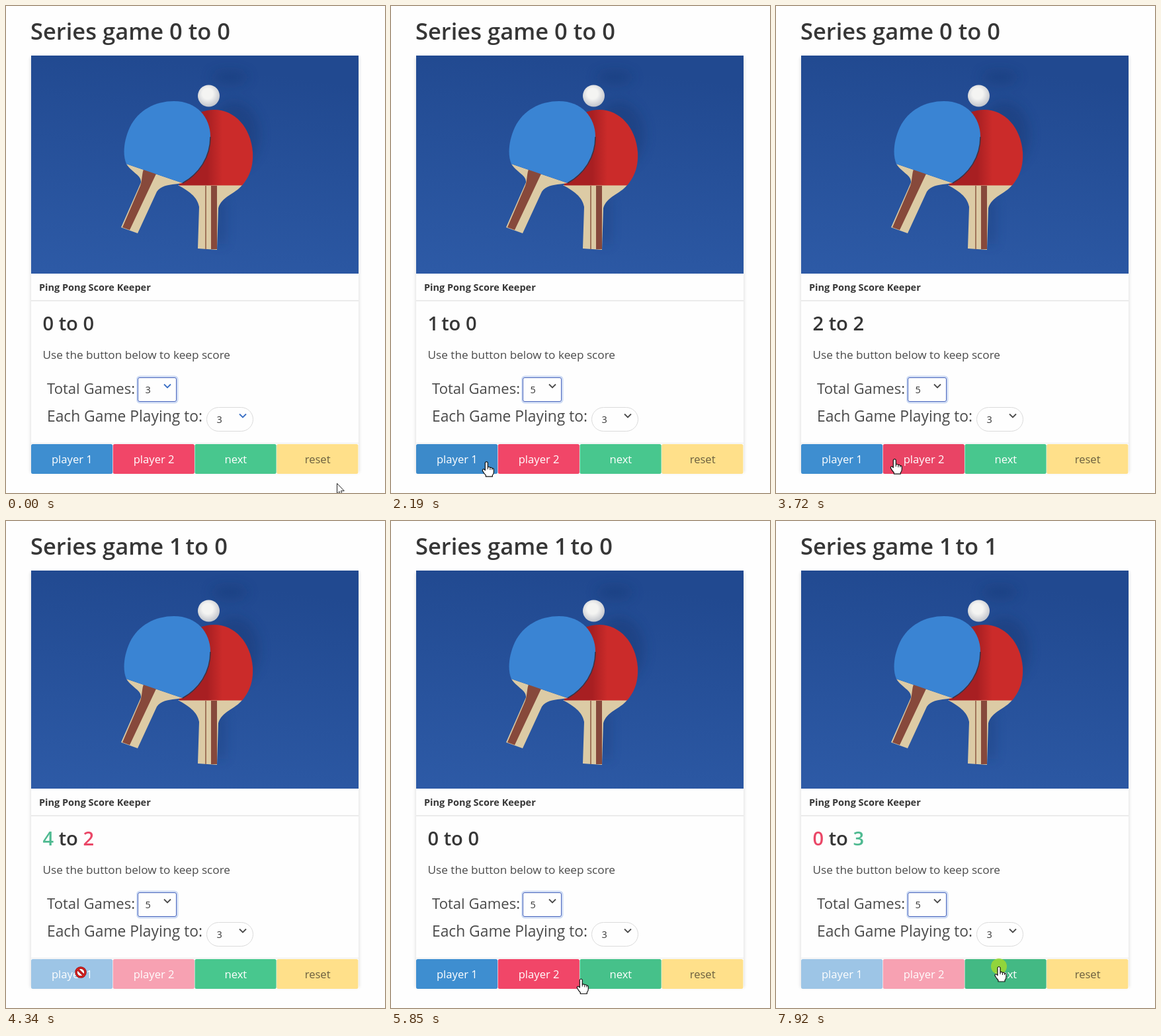
These frames come from a looping animation (573 by 737 pixels, 8 s). An HTML page:

```html
<!DOCTYPE html>
<html lang="en">
<head>
<meta charset="utf-8">
<title>Ping Pong Score Keeper</title>
<style>
html, body { margin: 0; height: 100%; overflow: hidden; background: #fefefe; }
svg { display: block; font-family: "Open Sans", "Noto Sans", sans-serif; }
.strong { font-weight: 600; fill: #363636; }
.plain { fill: #4a4a4a; }
.value { fill: #363636; font-size: 14.5px; }
</style>
</head>
<body>
<svg width="573" height="737" viewBox="0 0 573 737">
  <defs>
    <linearGradient id="table" x1=".3" y1="0" x2=".1" y2="1">
      <stop offset="0" stop-color="#214990"/><stop offset="1" stop-color="#2d5aa6"/>
    </linearGradient>
    <linearGradient id="red">
      <stop offset=".4" stop-color="#a81f22"/><stop offset=".6" stop-color="#cb2b2a"/>
    </linearGradient>
    <radialGradient id="ball" cx=".45" cy=".4" r=".6">
      <stop offset=".4" stop-color="#f4f4f2"/><stop offset="1" stop-color="#c2c5cc"/>
    </radialGradient>
    <filter id="soft" x="-50%" y="-50%" width="200%" height="200%"><feGaussianBlur stdDeviation="9"/></filter>
    <filter id="fine"><feGaussianBlur stdDeviation="2.5"/></filter>
    <clipPath id="photo"><path d="M38 75H533V405H38Z"/></clipPath>
  </defs>
  <rect width="573" height="737" fill="#fefefe"/>
  <text id="series" class="strong" x="37" y="51" font-size="34.5"/>

  <rect x="37" y="78" width="497" height="628" fill="#0a0a0a" opacity=".12" filter="url(#fine)"/>
  <path d="M38 75H533V708H38Z" fill="#fefefe"/>
  <g clip-path="url(#photo)">
    <path d="M38 75H533V405H38Z" fill="url(#table)"/>
    <g fill="#14346e" filter="url(#soft)" opacity=".4">
      <ellipse cx="338" cy="108" rx="28" ry="10"/>
      <ellipse cx="345" cy="195" rx="38" ry="50"/>
      <path d="M316 290H330V360H316Z"/>
    </g>
    <path d="M260 271H357C346 285 326 288 321 306L319 369L290 367L292 304C289 288 276 280 260 271Z" fill="#dccba5"/>
    <path d="M310 272H319V368H310Z" fill="#87493b"/>
    <path d="M302 272V368" stroke="#a0755a" stroke-width="2"/>
    <path d="M262 271.500H357C370 256 374 240 373 221C370 184 346 157 315 157C285 157 262 180 258 200Z" fill="url(#red)"/>
    <path d="M182 239L267 268C249 271 236 270 228 281L199 344L174 335L204 267C205 256 190 252 182 239Z" fill="#dccba5"/>
    <path d="M208 247L227 254L187 339L176 335L203 272C206 264 205 256 208 247Z" fill="#87493b"/>
    <path d="M182 239C176 225 178 204 187 184C200 157 226 144 254 144C288 144 309 168 309 198C309 229 292 254 267 268Z" fill="#3a84d3"/>
    <path d="M267 268C292 254 309 229 309 198" fill="none" stroke="#3b3346" stroke-width="1.5"/>
    <circle cx="306.500" cy="136" r="16.500" fill="url(#ball)"/>
  </g>

  <path d="M38 446H533" stroke="#e4e4e4" stroke-width="1.500"/>
  <text class="strong" x="50" y="431" font-size="14.500" style="font-weight:700">Ping Pong Score Keeper</text>
  <text id="score" class="strong" x="55.500" y="491" font-size="29.100"/>
  <g class="plain">
    <text x="55.500" y="534" font-size="17.200">Use the button below to keep score</text>
    <text x="62" y="587" font-size="22.100">Total Games:</text>
    <text x="62" y="629" font-size="22.800">Each Game Playing to:</text>
  </g>
  <rect x="198.500" y="561" width="60.500" height="39" rx="4" fill="none" stroke="#cfdcf4" stroke-width="3"/>
  <rect x="199.500" y="562.500" width="58" height="36" rx="2.500" fill="#fefefe" stroke="#4a66bd"/>
  <rect x="303.500" y="607.500" width="70" height="36" rx="18" fill="#fefefe" stroke="#dbdbdb"/>
  <text id="games" class="value" x="210.500" y="586"/>
  <text class="value" x="318.500" y="631">3</text>
  <path id="chevrons" d="M239 572.500l5 5l5-5M353 617.500l5 5l5-5" fill="none" stroke-width="1.800"/>
  <path d="M38 661.500H533" stroke="#ededed"/>
  <g id="buttons" font-size="16.600" text-anchor="middle"/>
  <g id="list"/>
  <g id="pointer">
    <circle id="tap" r="12" fill="#a8dc28" fill-opacity=".78"/>
    <g id="cursor" stroke-linejoin="round"/>
  </g>
</svg>
<script>
const $ = id => document.getElementById(id);
const LOOP = 8000, TRAVEL = 700, LEFT = 38, WIDTH = 123.75, TARGET = 3;

const buttons = [
  { label: "player 1", fill: "#3e8ed0", ink: "#fff" },
  { label: "player 2", fill: "#f14668", ink: "#fff" },
  { label: "next", fill: "#48c78e", ink: "#fff" },
  { label: "reset", fill: "#ffe08a", ink: "#6a5f3f" },
];

const spots = {
  rest: [500, 722], select: [205, 567], option: [234, 633],
  one: [107, 690], oneAgain: [113, 683], two: [238, 687],
  next: [337, 698], nextAgain: [337, 674],
};

// Each tap: where, pressed at, released at. Everything else follows from these.
const taps = [
  ["rest", 0, 0], ["select", 690, 820], ["option", 960, 1230],
  ["one", 1920, 2050], ["two", 2450, 2520], ["one", 3030, 3160], ["two", 3440, 3510],
  ["oneAgain", 3950, 4070], ["oneAgain", 4270, 4340], ["next", 5360, 5430],
  ["two", 6200, 6270], ["two", 6950, 7020], ["two", 7220, 7290], ["nextAgain", 7900, LOOP],
].map(([spot, press, release]) => ({ at: spots[spot], press, release }));

const cursors = {
  arrow: `<path d="M.5 .5V16L4 12.700L6.500 18.500L8.800 17.500L6.400 11.800H11.300Z" fill="#fff" stroke="#222"/>`,
  hand: `<path d="M-2 2Q0-1 2 2V9Q4 7.500 5.500 9.500Q7.500 8.500 8.500 10.500Q11 10 11 13V16Q11 19 9 21V23H-1V21Q-4 18-6 14Q-6 11-3.500 12L-2 13.500Z" fill="#fff" stroke="#111" stroke-width="1.200"/>
    <path d="M2 9v3M5.500 10v3M8.500 11v2" stroke="#111"/>`,
  blocked: `<circle r="7" fill="#fff"/>` + [["#8a1414", 3.5], ["#d8201f", 2]].map(([color, width]) =>
    `<path d="M-5-5L5 5M7 0A7 7 0 1 1-7 0A7 7 0 1 1 7 0" fill="none" stroke="${color}" stroke-width="${width}"/>`).join(""),
};

function position(t) {
  const i = taps.findIndex(tap => tap.release > t), from = taps[i - 1], to = taps[i];
  const start = Math.max(from.release, to.press - TRAVEL);
  const u = Math.min(1, Math.max(0, (t - start) / (to.press - start)));
  const ease = u * u * (3 - 2 * u);
  return from.at.map((v, axis) => v + (to.at[axis] - v) * ease);
}

const buttonAt = ([x, y]) => y >= 663 && y <= 708 ? Math.floor((x - LEFT) / WIDTH) : -1;
const inSelect = ([x, y]) => x > 199 && x < 259 && y > 562 && y < 600;
const isOver = ([a, b]) => Math.max(a, b) >= TARGET && Math.abs(a - b) > 1;

// Replays every finished tap to get the state of the page.
function stateAt(t) {
  const state = { points: [0, 0], wins: [0, 0], games: 3, open: false };
  for (const { at, release } of taps) {
    if (release > t) break;
    const button = buttonAt(at);
    if (inSelect(at)) state.open = true;
    else if (state.open) { state.open = false; state.games = 5; }
    else if (button === 2) state.points = [0, 0];
    else if (button >= 0 && !isOver(state.points)) {
      state.points[button]++;
      if (isOver(state.points)) state.wins[button]++;
    }
  }
  return state;
}

// The figure 1 sits in a narrower space than the others.
const digit = (n, fill = "#363636") =>
  `<tspan fill="${fill}" letter-spacing="${n === 1 ? "-.12em" : 0}">${n}</tspan>`;

function set(id, html) {
  const el = $(id);
  if (el.shown !== html) el.innerHTML = el.shown = html;
}

function drawButton({ label, fill, ink }, i, disabled, shade) {
  const x = LEFT + WIDTH * i;
  const box = `x="${x}" y="663" width="${WIDTH - .6}" height="45" rx="2.500"`;
  return `<g opacity="${disabled ? .5 : 1}"><rect ${box} fill="${fill}"/><rect ${box} opacity="${shade}"/>
    <text x="${x + WIDTH / 2}" y="691.500" fill="${ink}">${label}</text></g>`;
}

function drawOption(n, i, marked) {
  const y = 601 + 18 * i;
  return `<rect x="200" y="${y}" width="57" height="18" fill="${marked ? "#1e78d7" : "#fff"}"/>
    <text x="211" y="${y + 14}" font-size="14" fill="${marked ? "#fff" : "#363636"}">${n}</text>`;
}

function draw(t) {
  const pos = position(t), [x, y] = pos;
  const { points: [a, b], wins, games, open } = stateAt(t);
  const over = isOver([a, b]);
  const pressed = taps.some(tap => t >= tap.press && t < tap.release);
  const hovered = buttonAt(pos);
  const tint = won => over ? (won ? "#4fba91" : "#ea4767") : undefined;

  set("series", `Series game ${wins.map(n => digit(n)).join(" to ")}`);
  set("score", `${digit(a, tint(a > b))} to ${digit(b, tint(b > a))}`);
  set("games", String(games));
  $("chevrons").setAttribute("stroke", games === 3 && !open ? "#3a6fc4" : "#4a4a4a");

  set("buttons", buttons.map((button, i) => {
    const disabled = over && i < 2;
    const shade = i !== hovered || disabled ? 0 : pressed ? .07 : .03;
    return drawButton(button, i, disabled, shade);
  }).join(""));

  set("list", open ? `<rect x="199.500" y="600.500" width="58" height="55" fill="#fff" stroke="#767676"/>` +
    [3, 5, 7].map((n, i) => drawOption(n, i, i === (y < 619 ? 0 : 1))).join("") : "");

  const kind = over && (hovered === 0 || hovered === 1) ? "blocked"
    : hovered >= 0 || (inSelect(pos) && !open) ? "hand" : "arrow";
  set("cursor", cursors[kind]);
  $("pointer").setAttribute("transform", `translate(${x} ${y})`);
  $("tap").setAttribute("visibility", pressed ? "visible" : "hidden");
}

const start = performance.now();
function tick() {
  draw((performance.now() - start) % LOOP);
  requestAnimationFrame(tick);
}
tick();
</script>
</body>
</html>
```
